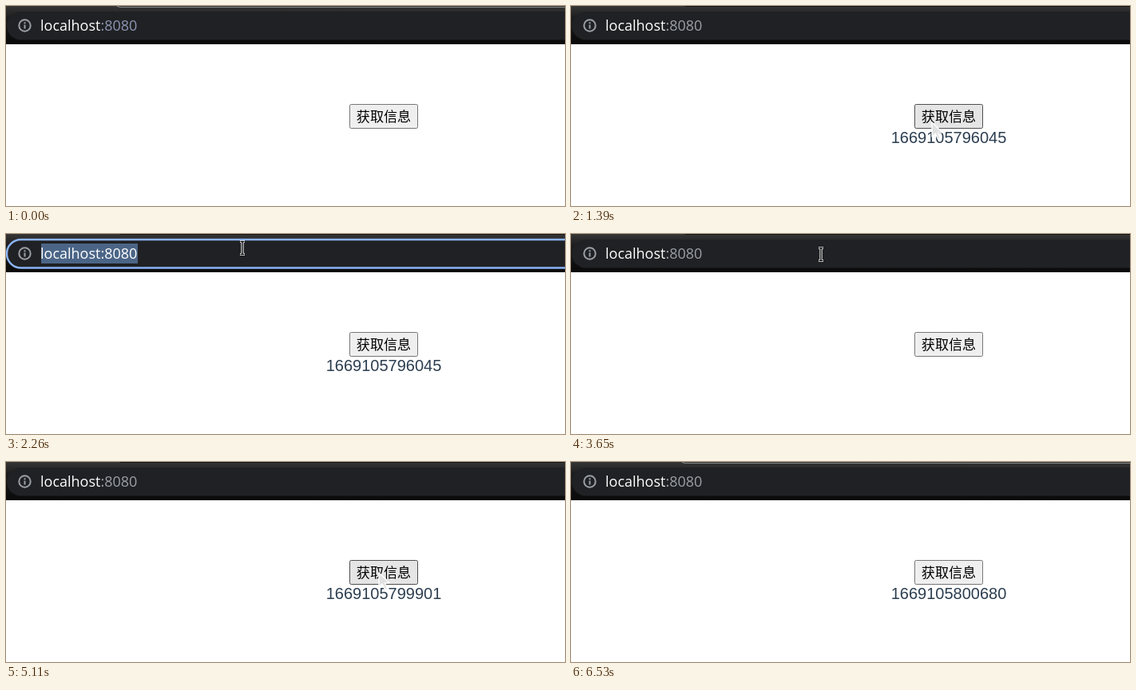
An HTML page that plays this animation: 700x251 px, repeating every 6.66 s.

```html
<!DOCTYPE html>
<html lang="zh">
<head>
<meta charset="utf-8">
<title>localhost:8080</title>
<style>
  html, body { margin: 0; height: 100%; overflow: hidden; background: #fff; }
  svg { display: block; width: 700px; height: 251px; }
  .url { font: 18px "Open Sans", "Noto Sans", sans-serif; }
  .host { font-weight: 500; }
  .label { font: 17.1px "Noto Sans CJK SC", "Noto Sans CJK", sans-serif; }
  .stamp { font: 20px "Liberation Sans", Arial, sans-serif; fill: #2c3e50; }
</style>
</head>
<body>
<svg viewBox="0 0 700 251">
  <defs>
    <linearGradient id="chrome" x2="0" y2="1">
      <stop offset="0" stop-color="#363636"/>
      <stop offset=".3" stop-color="#1d1d1d"/>
      <stop offset="1" stop-color="#090909"/>
    </linearGradient>
  </defs>
  <rect width="700" height="251" fill="#fff"/>
  <rect width="700" height="48" fill="url(#chrome)"/>
  <path id="tab" d="M139 0Q141 1.5 145 1.5H700" fill="none" stroke="#85878a" stroke-width="1.2"/>
  <path id="edge" d="M143 .5H700" stroke="#141414"/>
  <rect id="bar" x="1" y="7" width="730" height="35.5" rx="17.7" fill="#202124" stroke-width="2.4"/>
  <g fill="none" stroke="#9aa0a6" stroke-width="2">
    <circle cx="23.5" cy="24.5" r="7.2"/>
    <path d="M23.5 23.5V28.5M23.5 20.3V22.3"/>
  </g>
  <rect id="pick" x="44" y="12" width="121" height="25" fill="#4b6587"/>
  <text class="url" x="43" y="31" fill="#fff"><tspan class="host">localhost</tspan><tspan id="port">:8080</tspan></text>

  <rect id="button" x="430.5" y="123.5" width="85" height="30" rx="1.8"/>
  <text class="label" x="473" y="145" text-anchor="middle" fill="#000">获取信息</text>
  <text class="stamp" id="stamp" x="473" y="172" text-anchor="middle"></text>

  <path id="arrow" d="M0 0V18L4.3 14L7.4 21L10.4 19.7L7.4 12.8H13Z"
        stroke="#fff" stroke-width="1.3" stroke-linejoin="round"/>
  <g id="beam" fill="none">
    <path d="M-3-8H3M0-8V8M-3 8H3" stroke="#fff" stroke-width="3.2"/>
    <path id="core" d="M-2.6-8H2.6M0-8V8M-2.6 8H2.6" stroke-width="1.3"/>
  </g>
</svg>
<script>
const LOOP = 6660;
const $ = id => document.getElementById(id);
const tab = $('tab'), edge = $('edge'), bar = $('bar'), pick = $('pick'), port = $('port');
const button = $('button'), stamp = $('stamp');
const arrow = $('arrow'), beam = $('beam'), core = $('core');

// Pointer path: time, x, y
const path = [
  [70, 600, 232], [660, 452, 146], [1460, 452, 146], [2060, 296, 17.5],
  [3640, 296, 17.5], [3650, 313, 25.5], [3720, 313, 25.5], [3880, 467, 139],
  [5750, 467, 139], [6190, 628, 249]
];
// Time of each click and the value it brings
const clicks = [
  [1000, '1669105796045'], [3916, '1669105798961'],
  [4856, '1669105799901'], [5635, '1669105800680']
];
const FOCUS = 2120, BLUR = 3050, RELOAD = 3180;

const within = (t, a, b) => t >= a && t < b;
const clamp = v => Math.min(1, Math.max(0, v));
const ease = p => p * p * (3 - 2 * p);
const show = (el, on) => el.setAttribute('visibility', on ? 'visible' : 'hidden');
const set = (el, name, value) => el.setAttribute(name, value);

function pointer(t) {
  const i = path.findIndex(p => p[0] > t);
  if (i < 1) return null;
  const [t0, x0, y0] = path[i - 1], [t1, x1, y1] = path[i];
  const k = ease((t - t0) / (t1 - t0));
  return [x0 + (x1 - x0) * k, y0 + (y1 - y0) * k];
}

// The arrow pales while it rests on the button
function paleness(t) {
  if (within(t, 790, 1460)) return clamp((t - 790) / 600);
  if (within(t, 4380, 5750)) return clamp((t - 4380) / 600);
  return 0;
}

function value(t) {
  if (within(t, RELOAD, clicks[1][0])) return '';
  const last = clicks.filter(c => c[0] <= t).pop();
  return last ? last[1] : '';
}

function draw(t) {
  const focused = within(t, FOCUS, BLUR);
  const active = within(t, 900, 6530);
  show(tab, !active);
  show(edge, active);
  set(bar, 'stroke', focused ? '#8ab4f8' : 'none');
  show(pick, focused);
  set(port, 'fill', focused ? '#fff' : t < 70 ? '#8d96b2' : '#9aa0a6');

  const at = pointer(t);
  const over = at && within(at[0], 430, 516) && within(at[1], 123, 154);
  const down = clicks.some(c => within(t, c[0] - 80, c[0]));
  set(button, 'fill', down ? '#f5f5f5' : over ? '#e5e5e5' : '#efefef');
  set(button, 'stroke', over ? '#4f4f4f' : '#767676');
  stamp.textContent = value(t);

  const onBar = at && at[1] < 47;
  show(arrow, at && !onBar);
  show(beam, onBar);
  show(core, onBar);
  if (!at) return;
  const move = `translate(${at[0].toFixed(2)} ${at[1].toFixed(2)})`;
  set(arrow, 'transform', move);
  set(beam, 'transform', move);
  const shade = Math.round(225 * paleness(t));
  set(arrow, 'fill', `rgb(${shade},${shade},${shade})`);
  set(core, 'stroke', within(t, 1460, 2260) ? '#555' : '#000');
}

const start = performance.now();
function tick() {
  draw((performance.now() - start) % LOOP);
  requestAnimationFrame(tick);
}
tick();
</script>
</body>
</html>
```
